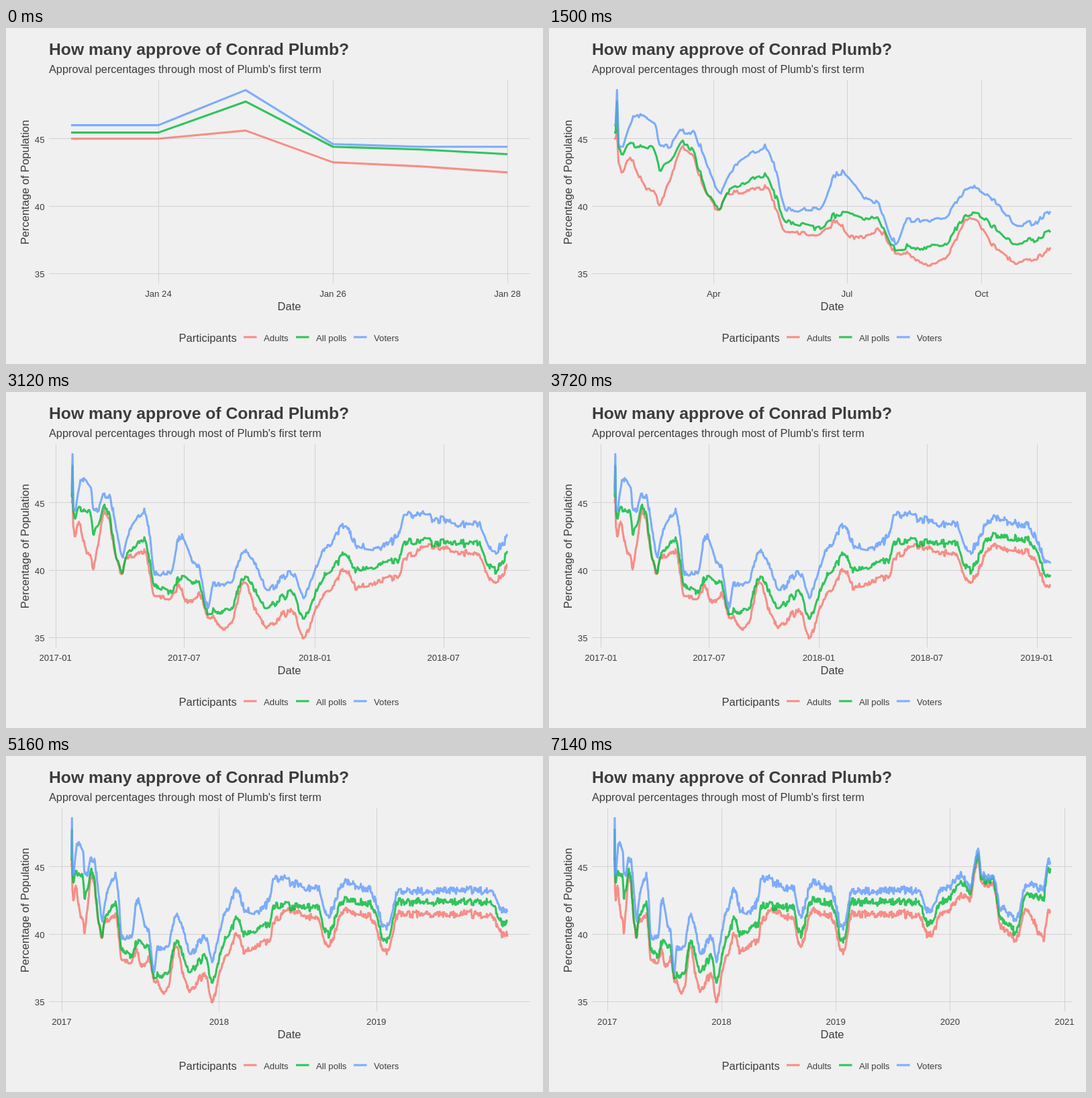
Write an HTML page that moves like this. It is 800 by 500 pixels and loops after 8 s.

```html
<!DOCTYPE html>
<html lang="en">
<head>
<meta charset="utf-8">
<title>Approval chart</title>
<style>
  html, body { margin: 0; width: 100%; height: 100%; overflow: hidden; background: #f0f0f0; }
  svg { display: block; width: 800px; height: 500px; overflow: hidden; }
  text { font: 13.2px "Liberation Sans", Arial, sans-serif; fill: #3c3c3c; }
  .title { font-size: 24.7px; font-weight: bold; }
  .sub { font-size: 16.3px; }
  .name { font-size: 16.5px; }
  .mid { text-anchor: middle; }
  .end { text-anchor: end; }
  .grid { stroke: #d2d2d2; stroke-width: 1; fill: none; }
  .line { stroke-width: 3.1; stroke-opacity: .8; stroke-linejoin: round; fill: none; }
</style>
</head>
<body>
<svg id="chart" viewBox="0 0 800 500">
  <text class="title" x="64" y="40">How many approve of Conrad Plumb?</text>
  <text class="sub" x="64" y="67">Approval percentages through most of Plumb's first term</text>
  <text class="name mid" transform="translate(34 229.5) rotate(-90)">Percentage of Population</text>
  <text class="name mid" x="422" y="420">Date</text>
  <text class="name" x="257.5" y="467">Participants</text>
</svg>
<script>
const STEP = 60, LAST = 119, LOOP = 8000;
const LEFT = 97, WIDTH = 650, DAYS = 1394;
const MS_DAY = 864e5, START = Date.UTC(2017, 0, 23) / MS_DAY;

// Turning points [day, percent] of the common trend
const trend = [
  [0, 45.45], [1, 45.45], [2, 47.75], [3, 44.4], [4, 44.2], [5, 43.85],
  [10, 44.7], [28, 44.2], [31, 42.9], [36, 43], [48, 44.7], [71, 40], [80, 41.4], [103, 42.3],
  [118, 38.9], [138, 38.3], [157, 39.6], [180, 39], [192, 37], [223, 37.1], [245, 39.5],
  [275, 37.3], [310, 38.3], [326, 36.5], [360, 39.8], [388, 41.3], [397, 40.1], [460, 40.6],
  [469, 42.1], [572, 42], [594, 40], [635, 42.6], [690, 42.3], [731, 39.6], [760, 42.4],
  [910, 42.4], [970, 42.4], [1004, 40.8], [1055, 42.5], [1117, 43.8], [1135, 43.1], [1163, 45.7],
  [1175, 44], [1212, 43.9], [1236, 41], [1285, 40.2], [1318, 42.9], [1372, 42.7], [1386, 44.7]
];

// Each group keeps a slowly changing gap [day, points] to the trend
const series = [
  {
    name: 'Adults', color: '#f8766d', key: 354, seed: 11,
    gap: [[0, -.45], [1, -.45], [2, -2.15], [3, -1.15], [5, -1.35], [9, -1], [24, -3.2], [48, -.4],
      [71, -.2], [103, -.9], [150, -.4], [162, -1.7], [192, -.2], [215, -1.3], [245, -.4], [260, -1.4],
      [460, -1.2], [510, -.4], [590, -.9], [1100, -.9], [1163, -.3], [1290, -.6], [1386, -3.1]]
  },
  { name: 'All polls', color: '#00ba38', key: 432, seed: 29, gap: [[0, 0]] },
  {
    name: 'Voters', color: '#619cff', key: 518, seed: 47,
    gap: [[0, .55], [1, .55], [2, .85], [3, .2], [4, .2], [5, .55], [16, 2.3], [48, .9], [62, 2],
      [75, 1], [90, 2], [110, 2], [118, .9], [140, 1.4], [152, 3], [178, 1.2], [192, .4], [200, 2],
      [262, 1.9], [280, 1.3], [380, 2.1], [440, 1.2], [467, 2.1], [560, 1.4], [770, .8],
      [1050, .9], [1150, .4], [1210, .2], [1240, .9], [1386, .7]]
  }
];

const svg = document.getElementById('chart');
function add(tag, attrs, text) {
  const el = document.createElementNS('http://www.w3.org/2000/svg', tag);
  for (const k in attrs) el.setAttribute(k, attrs[k]);
  if (text) el.textContent = text;
  return svg.appendChild(el);
}

const yOf = v => 265.1 - 20.08 * (v - 40);

// Eased value between two neighbouring points
function curve(points, day) {
  const n = points.findIndex(p => p[0] > day);
  if (n < 0) return points[points.length - 1][1];
  const [d0, v0] = points[n - 1], [d1, v1] = points[n];
  return v0 + (v1 - v0) * (1 - Math.cos(Math.PI * (day - d0) / (d1 - d0))) / 2;
}

// Seeded noise that holds its level for a few days, then jumps
function wobble(seed, size) {
  let s = seed * 7919, level = 0;
  const rnd = () => (s = (s * 16807) % 2147483647) / 2147483647;
  return Array.from({ length: DAYS + 1 }, (_, day) => {
    if (day > 5 && rnd() < .4) level = (rnd() - .5) * 2 * size;
    return level;
  });
}

const common = wobble(5, .2);
function daily({ gap, seed }) {
  return wobble(seed, .14).map((own, day) => curve(trend, day) + curve(gap, day) + common[day] + own);
}

// Axis ticks: the finest step with at most five ticks in view
const everyDays = (n, first) =>
  Array.from({ length: Math.ceil(60 / n) }, (_, i) => first + n * i);
const everyMonths = (n, dates = [1]) => {
  const out = [];
  for (let m = 0; m <= 48; m += n) {
    for (const d of dates) out.push(Date.UTC(2017, m, d) / MS_DAY - START);
  }
  return out;
};
const dateOf = d => new Date((d + START) * MS_DAY);
const month = t => t.toLocaleString('en-US', { month: 'short', timeZone: 'UTC' });
const two = n => String(n).padStart(2, '0');
const monthDay = t => month(t) + ' ' + two(t.getUTCDate());
const yearMonth = t => t.getUTCFullYear() + '-' + two(t.getUTCMonth() + 1);
const year = t => String(t.getUTCFullYear());
const steps = [
  [everyDays(1, 0), monthDay],
  [everyDays(2, 1), monthDay],
  [everyDays(7, 0), monthDay],
  [everyMonths(1, [1, 15]), monthDay],
  [everyMonths(1), month],
  [everyMonths(3), month],
  [everyMonths(6), yearMonth],
  [everyMonths(12), year]
];

function ticks(end) {
  for (const [all, format] of steps) {
    const days = all.filter(d => d >= -.05 * end && d <= 1.05 * end);
    if (days.length > 5) continue;
    const dates = days.map(dateOf);
    const years = new Set(dates.map(year));
    const label = format === month && years.size > 1 ? yearMonth : format;
    return days.map((day, i) => ({ day, text: label(dates[i]) }));
  }
}

add('path', { class: 'grid', d: 'M64 164.5H780M64 265.5H780M64 365.5H780' });
[45, 40, 35].forEach((v, i) => add('text', { class: 'end', x: 57.5, y: 170.5 + 100.2 * i }, String(v)));
const columns = add('path', { class: 'grid' });
const labels = Array.from({ length: 5 }, () => add('text', { class: 'mid', y: 400 }));

for (const s of series) {
  s.values = daily(s);
  s.path = add('path', { class: 'line', stroke: s.color });
  add('path', { class: 'line', stroke: s.color, d: `M${s.key} 460H${s.key + 19.5}` });
  add('text', { x: s.key + 30, y: 466 }, s.name);
}

function draw(i) {
  const reach = 5 + 11.706 * i, end = Math.min(Math.round(reach), DAYS);
  const xOf = day => LEFT + WIDTH * day / end;
  const marks = ticks(reach);
  columns.setAttribute('d', marks.map(m => `M${Math.round(xOf(m.day)) + .5} 78V380`).join(''));
  labels.forEach((el, n) => {
    el.textContent = marks[n] ? marks[n].text : '';
    if (marks[n]) el.setAttribute('x', xOf(marks[n].day));
  });
  for (const { values, path } of series) {
    const points = values.slice(0, end + 1).map((v, d) => xOf(d).toFixed(2) + ' ' + yOf(v).toFixed(2));
    path.setAttribute('d', 'M' + points.join('L'));
  }
}

const begin = performance.now();
let shown = -1;
function tick() {
  const t = (performance.now() - begin) % LOOP;
  const i = Math.min(LAST, Math.floor(t / STEP));
  if (i !== shown) draw(shown = i);
  requestAnimationFrame(tick);
}
tick();
</script>
</body>
</html>
```
